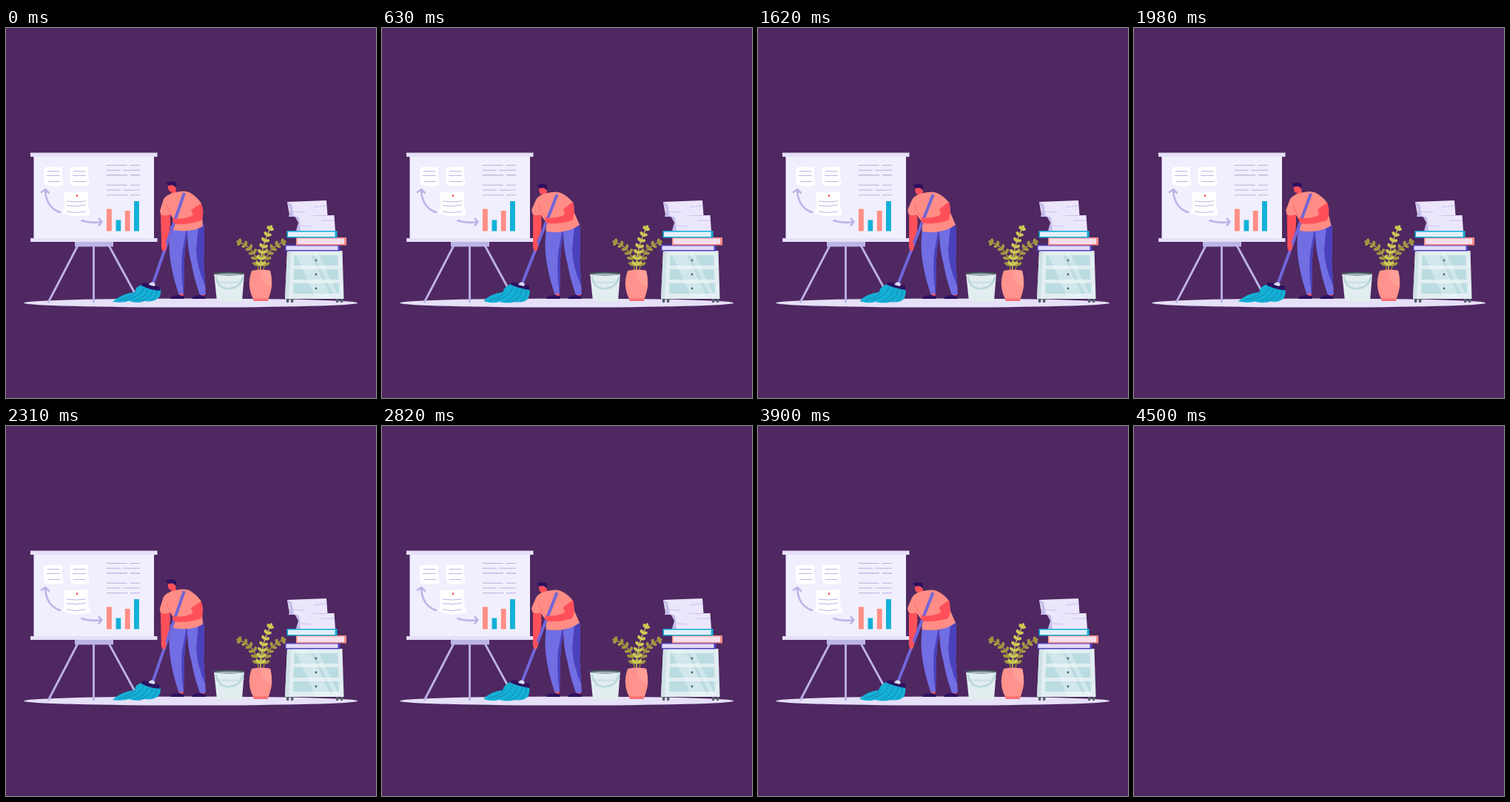
An HTML page with a canvas for the animation above (4530 ms loop, 500 by 500 pixels).

```html
<!DOCTYPE html>
<html lang="en">
<head>
<meta charset="utf-8">
<title>Office cleaning</title>
<style>
html, body { margin: 0; width: 100%; height: 100%; overflow: hidden; background: #4f2861; }
canvas { display: block; width: 100%; height: 100%; }
</style>
</head>
<body>
<canvas id="stage" width="500" height="500"></canvas>
<script>
const ctx = document.getElementById('stage').getContext('2d');
const LOOP = 4530, BLANK_AT = 4500, SWING = 1110, PHASE = 20;
const CORAL = '#ff8d85', RED = '#ff505a', CYAN = '#14b0d6', INK = '#2c1160';
const LILAC = '#e6e0f8', VIOLET = '#bdb3e6', INDIGO = '#4b40bd', BLUE = '#716de3';

function fill(path, color) {
  ctx.fillStyle = color;
  ctx.fill(new Path2D(path));
}

function line(path, color, width = 1, cap = 'butt') {
  ctx.strokeStyle = color;
  ctx.lineWidth = width;
  ctx.lineCap = cap;
  ctx.lineJoin = 'round';
  ctx.stroke(new Path2D(path));
}

function rect(x, y, w, h, color) {
  ctx.fillStyle = color;
  ctx.fillRect(x, y, w, h);
}

function oval(x, y, rx, ry, color, angle = 0) {
  ctx.fillStyle = color;
  ctx.beginPath();
  ctx.ellipse(x, y, rx, ry, angle, 0, Math.PI * 2);
  ctx.fill();
}

// Blends two paths that share the same commands.
function morph(from, to, k) {
  const ends = to.match(/[\d.]+/g);
  let i = 0;
  return from.replace(/[\d.]+/g, n => +n + (ends[i++] - n) * k);
}

function drawBoard() {
  line('M97 294L57 371M118.5 294V371M139 294L181 371', VIOLET, 2.8);
  rect(93, 288, 52, 7.5, VIOLET);
  rect(37.5, 172, 162.5, 113, '#f1effd');
  rect(33, 168.5, 171.5, 5.5, LILAC);
  rect(33, 284, 171.5, 5, LILAC);

  for (const x of [0, 35]) {
    fill(`M${52 + x} 188L${76 + x} 187.5Q${75 + x} 203 ${78 + x} 212Q${65 + x} 216 ${53 + x} 212Q${50 + x} 203 ${52 + x} 188Z`, '#fff');
    line(`M${56 + x} 193.5h16m-17 6h18m-17 8h17`, '#bdb4e4', 1);
  }
  fill('M78 222L111 221.5Q109 240 114 252Q94 258 77 250Q80 238 78 222Z', '#fff');
  line('M82 234Q95 236 108 234M82 240Q96 242 108 239M82 248Q95 251 108 248', '#bdb4e4', 1);
  oval(96, 226.7, 1.4, 1.4, RED);

  line('M74 249.5Q54 243 53 219M47 222.5L53 218L58.5 223.5', VIOLET, 2.6);
  line('M101.5 260Q114 264.5 128 262M125 257L129.5 262L125 267.5', VIOLET, 2.6);

  for (const y of [185.5, 212.3]) {
    line(`M136 ${y}h27.5m4.5 0h13M136 ${y + 6.7}h19m3.5 0h22.5M136 ${y + 13.4}h28m4 0h13`, '#b8b0dc', 1.1);
  }
  rect(136, 244.5, 6.8, 30, CORAL);
  rect(148.5, 259.5, 6.7, 15, CYAN);
  rect(160.8, 247, 6.8, 27.5, CORAL);
  rect(173, 234, 6.9, 40.5, CYAN);
}

function drawBucket() {
  fill('M281 331L322 331L319 369Q301 373 285 369Z', '#e2edef');
  fill('M282 341Q301 344 321.5 341L321 344Q301 347 282.5 344Z', '#cfe2e5');
  line('M283.5 336Q288 354 302 352Q317 351 320 336', '#b9d7dc', 2.4);
  oval(301.5, 332, 21, 2.4, '#46525b');
  oval(301.5, 332.8, 18.5, 1.3, '#9fb6bd');
}

// Paired leaves along a quadratic stem, largest near the middle.
function drawSprig([x0, y0, x1, y1, x2, y2], color, pairs) {
  line(`M${x0} ${y0}Q${x1} ${y1} ${x2} ${y2}`, color, 1.4);
  for (let i = 0; i < pairs; i++) {
    const t = 0.12 + 0.82 * i / (pairs - 1), u = 1 - t;
    const x = u * u * x0 + 2 * u * t * x1 + t * t * x2;
    const y = u * u * y0 + 2 * u * t * y1 + t * t * y2;
    const angle = Math.atan2(u * (y1 - y0) + t * (y2 - y1), u * (x1 - x0) + t * (x2 - x1));
    const size = 4.3 - 1.5 * t;
    for (const side of [-1, 1]) {
      const a = angle + side * 0.95;
      oval(x + Math.cos(a) * size, y + Math.sin(a) * size, size, 2.1, color, a);
    }
  }
  oval(x2, y2, 2.8, 1.9, color, Math.atan2(y2 - y1, x2 - x1));
}

function drawPlant() {
  drawSprig([341, 328, 340, 297, 314, 289], '#a19643', 6);
  drawSprig([348, 328, 350, 297, 376, 289], '#a19643', 6);
  drawSprig([344, 328, 343, 298, 358, 269], '#cbc957', 7);
  fill('M332 328Q344 325 357 328Q360 342 359 350Q357 361 354 367H335Q330 360 329 349Q328 339 332 328Z', '#ff928c');
  fill('M344 328Q351 326 357 328Q360 340 358 348Q346 349 344 328Z', '#ff9e96');
  fill('M333 365.5H355.5L353.5 369H335Z', '#ff6f72');
}

function drawCabinet() {
  for (const x of [379, 385, 446, 452]) fill(`M${x} 365h4l-1 6h-3Z`, '#59616c');
  fill('M380 301H454.5L456.5 366H377Z', '#e1eef1');
  fill('M380 301H385L382 366H377Z', '#cfe2e6');
  for (let i = 0; i < 3; i++) {
    const y = 307 + i * 19;
    fill(`M${389.5 - i * .5} ${y}H${448.5 + i * .5}l.4 14H${389 - i * .5}Z`, '#bbdce1');
  }
  ctx.globalAlpha = 0.4;
  fill('M390 302H410L440 366H419ZM414 302H421L450 364H444Z', '#f0f8f9');
  ctx.globalAlpha = 1;
  for (const y of [314, 333, 352]) oval(419, y, 1.4, 1.4, '#4d626d');
}

function drawBook(x, y, w, h, cover, pages) {
  rect(x, y, w, h, cover);
  rect(x + 1.5, y + 1.5, w - 4.5, h - 3, pages);
}

function drawPapers() {
  drawBook(377, 293, 74.5, 8.5, INDIGO, '#e2daf8');
  drawBook(392, 283, 68, 10.5, CORAL, '#f5dfec');
  drawBook(379.5, 274, 68, 9.5, CYAN, '#e2effb');
  fill('M390 254L443.5 253L445 274H394L397 264Z', '#ebe6fc');
  fill('M390 254L396 256L398 274H392L395 263Z', '#c5bdec');
  fill('M380 235L433 233L434.5 253L388 255L383 252Z', '#ebe6fc');
  fill('M380 235L386 238L389 255H382L384 246Z', '#c5bdec');
  line('M388 248L404 249M416 242L433 240M398 267L412 268M426 260L444 260', '#c8c0ec', 1);
}

function drawLegs() {
  fill('M234 356h5.5v6h-5.5ZM262.5 356h5.5v6h-5.5Z', RED);
  fill('M222 366Q223 361 233 361Q240 361 241 366ZM251 366Q252 361 262 361Q269 361 270.5 366Z', INK);
  fill('M222 268H247Q240 300 241 325L240 359L233.5 360Q220 320 220.5 290Z', BLUE);
  fill('M244 272L247 270Q240 300 241 325L240 359Q236 332 238 304Z', INDIGO);
  fill('M245 268L267 264Q269 290 267 315L270 360L262 361Q254 338 251 320Q244 295 245 268Z', BLUE);
  fill('M260 268L267 264Q269 290 267 315L269 348Q258 323 257 300Z', INDIGO);
}

function drawMop(k) {
  fill(morph(
    'M184 347Q175 349 174 357Q156 359 144 370Q158 372 166 369Q178 373 187 369Q201 371 207 364Q211 358 208 352Z',
    'M174 346Q165 349 163 357Q146 359 137 369Q149 373 158 370Q171 373 179 370Q191 372 197 366Q201 358 198 351Z', k), CYAN);
  line(morph(
    'M187 351Q183 363 160 368M192 353Q190 364 173 369M198 354Q199 363 183 369M203 355Q206 361 196 368M176 357Q169 363 153 368',
    'M177 350Q174 363 153 368M183 352Q181 364 166 370M189 353Q190 363 175 370M194 354Q197 361 187 369M166 357Q161 363 145 368', k), '#1581ad', 0.9);
  fill(morph(
    'M184 345Q187 343 196 347L208 350L208 355Q194 354 183 348Z',
    'M174 345Q178 342 187 346L199 348L199 354Q185 352 174 347Z', k), INK);
  fill(morph('M193 347Q195 342 200 344L202 347L200 349Z', 'M184 347Q186 342 191 344L193 347L191 349Z', k), '#d9dcf2');
}

function drawMan(k) {
  drawLegs();
  fill(morph(
    'M209 249L222 251Q223 275 217 291Q217 300 213 302Q209 300 210 290Z',
    'M204 249L215 252Q217 275 210 292Q211 300 207 302Q203 299 204 290Z', k), RED);

  ctx.save();
  ctx.translate(-7 * k, 3.8 * k);
  fill('M219.5 211L229 209L230 223Q226 227 223 223L224 221Q220 222 219 216Z', RED);
  fill('M216 209Q222 205.5 229.5 208.5L230.5 214L228 215Q227 211 220 213Z', INK);
  ctx.restore();

  fill(morph(
    'M229 222Q241 219 248 222Q258 228 264 237L265 252L266 268Q250 277 226 273L227 260L222 252Q214 255 209 252L208 247L213 231Q217 225 229 222Z',
    'M223 223Q236 220 242 223Q252 228 258 236L260 250L267 266Q250 279 222 275L221 262L214 252Q207 255 203 251L202 246L208 232Q212 225 223 223Z', k), CORAL);
  line(morph('M217 239Q220 248 227 258', 'M211 238Q214 248 222 258', k), '#f86a6d', 1);
  line(morph('M241 223L198.5 346', 'M236.5 225L189 346', k), '#7165d8', 4);
  fill(morph(
    'M250 246Q257 241 264 237Q269 250 264 260Q248 266 230 265Q223 263 226 257Q240 259 253 253Z',
    'M245 245Q251 240 258 235Q262 250 257 260Q241 265 224 264Q218 262 221 256Q235 258 247 252Z', k), RED);
  fill(morph('M211 291Q216 288 217 293Q217 300 213 302Q210 301 211 291Z', 'M205 291Q209 288 211 293Q211 300 207 302Q204 301 205 291Z', k), RED);
  drawMop(k);
}

function draw(time) {
  rect(0, 0, 500, 500, '#4f2861');
  if (time >= BLANK_AT) return;
  const swing = (1 - Math.cos((time - PHASE) / SWING * Math.PI * 2)) / 2;
  oval(249.7, 371.6, 225.7, 6, LILAC);
  drawBoard();
  drawBucket();
  drawPlant();
  drawCabinet();
  drawPapers();
  drawMan(swing);
}

const start = performance.now();
function tick() {
  draw((performance.now() - start) % LOOP);
  requestAnimationFrame(tick);
}
tick();
</script>
</body>
</html>
```
